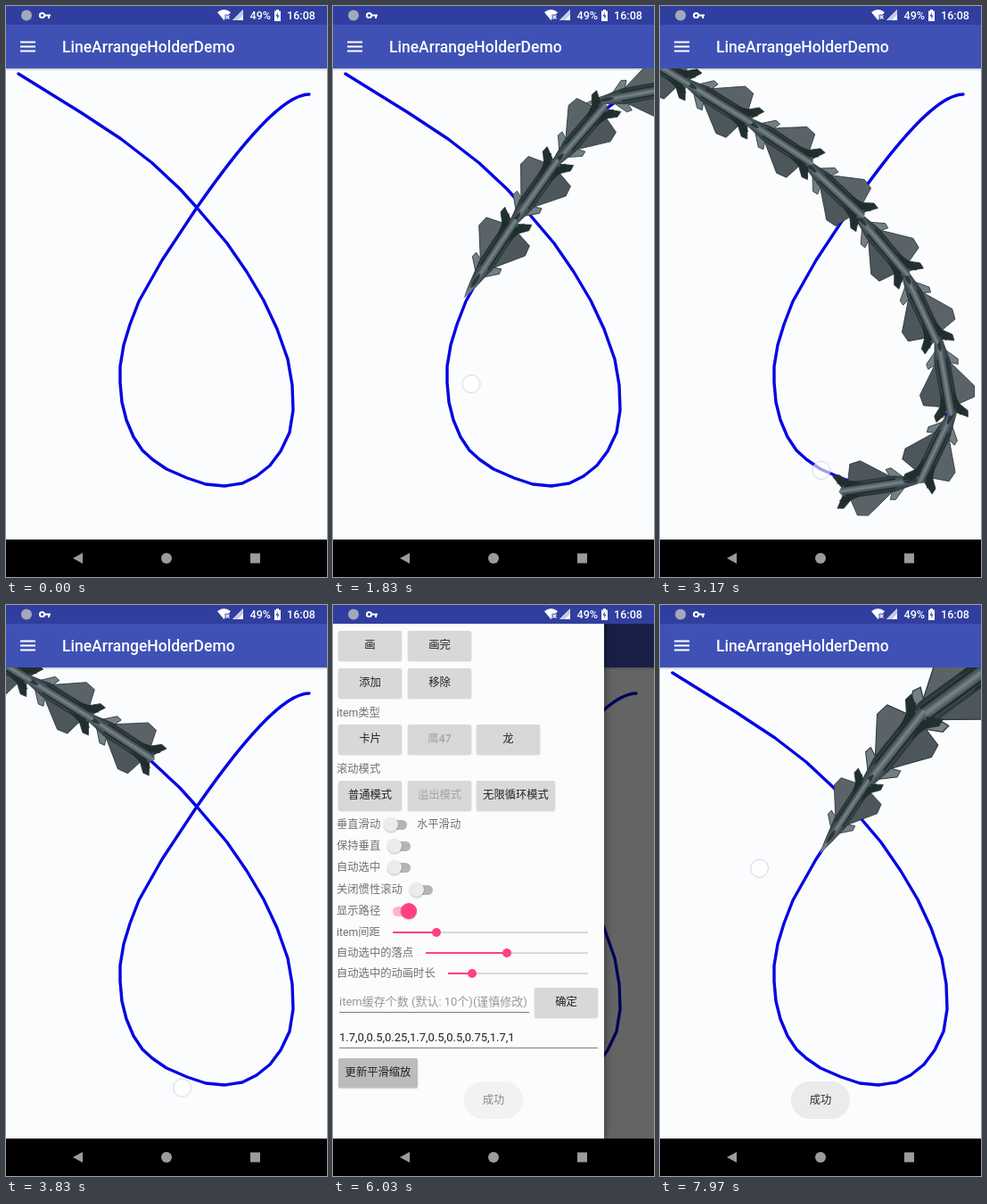
Write an HTML page without scripts that moves like this. It is 360x640 px and loops after 8000 ms.

```html
<!DOCTYPE html>
<html lang="zh-CN">
<head>
<meta charset="utf-8">
<title>Curve scroller</title>
<style>
@property --s { syntax: "<number>"; inherits: true; initial-value: -80; }
@property --g { syntax: "<number>"; inherits: true; initial-value: 0; }

html, body { margin: 0; width: 100%; height: 100%; overflow: hidden; }
body { background: #fbfcfd; }
.stage {
  position: relative; width: 360px; height: 640px; overflow: hidden;
  font: 12.3px Roboto, "Noto Sans CJK SC", "Noto Sans CJK", sans-serif;
}
.stage > svg, .fleet, .page { position: absolute; left: 0; top: 0; width: 360px; height: 640px; }
.fleet { clip-path: inset(70px 0 42px); }
.page { clip-path: inset(21px 0 42px); }

/* --s: distance of the leading jet along the curve, --g: scaling by position */
.fleet { animation: fly 8s linear infinite; }
.jet {
  --d: calc(var(--s) - 82 * var(--i));
  --u: clamp(0, var(--d) / 304.8, 2);
  position: absolute; left: 0; top: 0; width: 120px; height: 80px;
  z-index: calc(10 - var(--i));
  offset-path: path("M520 99H340C310 99 262 157 214 226L175 285 149 331 139 357 132 380 128 404 128 422 130 444 135 464 143 483 153 498 164 508 180 519 203 529 224 536 245 538 265 535 281 527 296 515 308 499 318 478 322 453 321 425 316 396 304 362 289 330 270 298 248 266 214 226 195 205 164 176 129 149 85 120 14 76-154-28");
  offset-distance: calc((var(--d) + 180) * 1px);
  offset-rotate: auto;
  transform: scale(calc(1 + var(--g) * (1.2 * max(1 - var(--u), var(--u) - 1) - .5)));
}
@keyframes fly {
  0%, 12.8% { --s: -80; }
  0%, 58.375% { --g: 0; }
  16.625% { --s: 150; animation-timing-function: ease-out; }
  22.125% { --s: 225; }
  22.875% { --s: 250; }
  25.625% { --s: 445; animation-timing-function: cubic-bezier(.3, .45, .6, .9); }
  32% { --s: 840; }
  32.875% { --s: 910; }
  35.625% { --s: 1100; animation-timing-function: cubic-bezier(.3, .45, .6, .9); }
  39.375% { --s: 1310; }
  42.5% { --s: 1550; animation-timing-function: cubic-bezier(.3, .5, .6, .95); }
  47% { --s: 1807; }
  47.875% { --s: 1828; }
  50%, 52.5% { --s: 1900; }
  58.375% { --s: 2085; }
  58.4%, 87.2% { --s: -130; }
  58.4%, 100% { --g: 1; }
  91.25% { --s: 100; animation-timing-function: ease-out; }
  97.25% { --s: 155; }
  99.625% { --s: 195; }
  100% { --s: 201; }
}

.finger {
  position: absolute; left: -10px; top: -10px; width: 19px; height: 19px;
  border: 1px solid #cfd0de; border-radius: 50%; background: #fff9;
  animation: drag 8s linear infinite, touch 8s step-end infinite;
}
@keyframes drag {
  0%, 12.8% { transform: translate(150px, 560px); }
  16.625%, 17% { transform: translate(158px, 330px); }
  22.125% { transform: translate(153px, 450px); }
  22.875% { transform: translate(154.5px, 424px); }
  25.625%, 26% { transform: translate(158px, 230px); }
  32% { transform: translate(159px, 440px); }
  32.875% { transform: translate(159px, 371px); }
  35.625%, 36% { transform: translate(166px, 180px); }
  39.375% { transform: translate(180px, 540px); }
  42.5%, 43% { transform: translate(185px, 300px); }
  47% { transform: translate(197px, 562px); }
  47.875% { transform: translate(197px, 541px); }
  50%, 52.5% { transform: translate(198px, 470px); }
  58.375% { transform: translate(200px, 290px); }
  87.2% { transform: translate(105px, 560px); }
  91.25%, 91.5% { transform: translate(108px, 330px); }
  97.25% { transform: translate(111px, 335px); }
  99.625% { transform: translate(111px, 295px); }
  100% { transform: translate(111px, 289px); }
}
@keyframes touch {
  0%, 16.7%, 25.7%, 35.7%, 42.6%, 58.4%, 91.3% { opacity: 0; }
  12.85%, 22.1%, 32%, 39.375%, 47%, 87.2%, 97.25% { opacity: 1; }
}

.scrim { position: absolute; inset: 0; background: #000; opacity: 0; animation: dim 8s linear infinite; }
.drawer {
  position: absolute; left: 0; top: 0; width: 304px; height: 598px;
  background: #fcfcfd; box-shadow: 0 0 9px #0008; color: #717171;
  transform: translateX(-320px); animation: slide 8s linear infinite;
}
@keyframes slide {
  0%, 61.6% { transform: translateX(-320px); animation-timing-function: cubic-bezier(.3, .4, .7, .9); }
  64.625% { transform: translateX(-54px); animation-timing-function: ease-out; }
  67.5%, 80.25% { transform: none; animation-timing-function: cubic-bezier(.3, .3, .4, 1); }
  83.75%, 100% { transform: translateX(-320px); }
}
@keyframes dim {
  0%, 61.6% { opacity: 0; }
  64.625% { opacity: .46; animation-timing-function: ease-out; }
  67.5%, 80.25% { opacity: .6; animation-timing-function: cubic-bezier(.3, .3, .4, 1); }
  83.75%, 100% { opacity: 0; }
}

.drawer > * { position: absolute; left: var(--x, 4px); top: var(--y); white-space: nowrap; }
.drawer b {
  width: var(--w, 71px); height: 33px; border-radius: 2px; background: #d7d8d8;
  box-shadow: 0 1px 2px #0003; color: #222;
  font-weight: 500; line-height: 33px; text-align: center;
}
.drawer .off { color: #a3a4a4; }
.drawer .press { animation: press 8s linear infinite; }
@keyframes press {
  0%, 73.2% { background: #d7d8d8; }
  74.3%, 76.5% { background: #bbbdbd; }
  79%, 100% { background: #d7d8d8; }
}
.drawer span { line-height: 16px; margin-top: -8px; }
.drawer .field { left: 7px; font-size: 13px; color: #979797; border-bottom: 1px solid #7d7d7d; width: var(--w); height: 19px; }
.drawer .dark { color: #222; }

.switch { width: 22px; height: 11px; margin-top: -5.5px; border-radius: 6px; background: #b5b5b5; }
.switch::after, .slider::after { content: ""; position: absolute; border-radius: 50%; }
.switch::after { left: -4px; top: -2.5px; width: 16px; height: 16px; background: #ececec; box-shadow: 0 1px 2px #0004; }
.switch.on { background: #ffb3cd; }
.switch.on::after { left: 9px; top: -3.5px; width: 18px; height: 18px; background: #ff4081; }
.slider {
  width: var(--w); height: 2px; margin-top: -1px;
  background: linear-gradient(90deg, #ff4081 var(--v), #d9d9d9 var(--v));
}
.slider::after { left: calc(var(--v) - 5px); top: -4px; width: 10px; height: 10px; background: #ff4081; }

.toast {
  position: absolute; left: 147px; top: 534px; width: 66px; height: 42px;
  border-radius: 21px; background: #ebebeb; color: #2c2c2c;
  line-height: 43px; text-align: center; opacity: 0; animation: toast 8s linear infinite;
}
@keyframes toast {
  0%, 74.3% { opacity: 0; }
  75.375% { opacity: .55; }
  76.5%, 100% { opacity: 1; }
}
</style>
</head>
<body>
<div class="stage">
  <svg viewBox="0 0 360 640">
    <defs>
      <linearGradient id="hull" x2="0" y2="1">
        <stop stop-color="#28343a"/><stop offset=".3" stop-color="#4b585d"/>
        <stop offset=".5" stop-color="#78868a"/><stop offset=".65" stop-color="#48555a"/>
        <stop offset="1" stop-color="#242f34"/>
      </linearGradient>
      <g id="side" stroke="#2b363a" stroke-width=".8">
        <path d="M12-5-24-31-36-29-42-6Z"/>
        <path d="M23-4 9-18 3-17 8-5Z" fill="#738083"/>
        <path d="M-34-5-50-19-57-18-48-3Z" fill="#22302f"/>
      </g>
      <symbol id="jet" viewBox="-60 -40 120 80">
        <use href="#side" fill="#4d575b"/>
        <use href="#side" fill="#5a6468" transform="scale(1 -1)"/>
        <path d="M54 0C42-4 24-6 10-9L-46-9-53 0-46 9 10 9C24 6 42 4 54 0Z" fill="url(#hull)"/>
        <path d="M12-5H-46M12 5H-46" stroke="#202b30" stroke-width="1.6"/>
        <path d="M-24-7-48-13-54-10-44-5ZM-24 7-48 13-54 10-44 5Z" fill="#1f2d2c"/>
        <path d="M40 0C34-3 24-3 20 0 24 3 34 3 40 0Z" fill="#2b373b"/>
      </symbol>
    </defs>
    <rect width="360" height="640" fill="#fbfcfd"/>
    <path fill="none" stroke="#0505e2" stroke-width="3.4" stroke-linecap="round" stroke-linejoin="round" d="M340 99C310 99 262 157 214 226L175 285 149 331 139 357 132 380 128 404V422L130 444 135 464 143 483 153 498 164 508 180 519 203 529 224 536 245 538 265 535 281 527 296 515 308 499 318 478 322 453 321 425 316 396 304 362 289 330 270 298 248 266 214 226 195 205 164 176 129 149 85 120 14 76"/>
    <rect y="70" width="360" height="2" fill="#0002"/>
    <rect y="21" width="360" height="49" fill="#3f51b5"/>
    <path d="M16 40.5H33M16 45.5H33M16 50.5H33" stroke="#fff" stroke-width="1.8"/>
    <text x="63" y="52" font-size="17.5" font-weight="500" fill="#fff">LineArrangeHolderDemo</text>
  </svg>

  <div class="fleet">
    <svg class="jet" style="--i:0"><use href="#jet"/></svg>
    <svg class="jet" style="--i:1"><use href="#jet"/></svg>
    <svg class="jet" style="--i:2"><use href="#jet"/></svg>
    <svg class="jet" style="--i:3"><use href="#jet"/></svg>
    <svg class="jet" style="--i:4"><use href="#jet"/></svg>
    <svg class="jet" style="--i:5"><use href="#jet"/></svg>
    <svg class="jet" style="--i:6"><use href="#jet"/></svg>
    <svg class="jet" style="--i:7"><use href="#jet"/></svg>
    <svg class="jet" style="--i:8"><use href="#jet"/></svg>
    <svg class="jet" style="--i:9"><use href="#jet"/></svg>
  </div>
  <div class="finger"></div>

  <div class="page">
    <div class="scrim"></div>
    <div class="drawer">
      <b style="--x:6px;--y:29px">画</b>
      <b style="--x:84px;--y:29px">画完</b>
      <b style="--x:6px;--y:71px">添加</b>
      <b style="--x:84px;--y:71px">移除</b>
      <span style="--y:121px">item类型</span>
      <b style="--x:6px;--y:134px">卡片</b>
      <b class="off" style="--x:84px;--y:134px">鹰47</b>
      <b style="--x:161px;--y:134px">龙</b>
      <span style="--y:184px">滚动模式</span>
      <b style="--x:6px;--y:197px">普通模式</b>
      <b class="off" style="--x:84px;--y:197px">溢出模式</b>
      <b style="--x:161px;--y:197px;--w:88px">无限循环模式</b>

      <span style="--y:246px">垂直滑动</span>
      <i class="switch" style="--x:61px;--y:246px"></i>
      <span style="--x:94px;--y:246px">水平滑动</span>
      <span style="--y:270px">保持垂直</span>
      <i class="switch" style="--x:65px;--y:270px"></i>
      <span style="--y:294px">自动选中</span>
      <i class="switch" style="--x:65px;--y:294px"></i>
      <span style="--y:319px">关闭惯性滚动</span>
      <i class="switch" style="--x:90px;--y:319px"></i>
      <span style="--y:343px">显示路径</span>
      <i class="switch on" style="--x:67px;--y:343px"></i>

      <span style="--y:367px">item间距</span>
      <i class="slider" style="--x:67px;--y:366.5px;--w:219px;--v:49px"></i>
      <span style="--y:390px">自动选中的落点</span>
      <i class="slider" style="--x:104px;--y:389.5px;--w:182px;--v:91px"></i>
      <span style="--y:413px">自动选中的动画时长</span>
      <i class="slider" style="--x:129px;--y:412.5px;--w:157px;--v:27px"></i>

      <span class="field" style="--y:445px;--w:213px">item缓存个数 (默认: 10个)(谨慎修改)</span>
      <b style="--x:226px;--y:429px">确定</b>
      <span class="field dark" style="--y:485px;--w:290px">1.7,0,0.5,0.25,1.7,0.5,0.5,0.75,1.7,1</span>
      <b class="press" style="--x:6px;--y:508px;--w:89px">更新平滑缩放</b>
    </div>
  </div>
  <div class="toast">成功</div>

  <svg viewBox="0 0 360 640">
    <rect width="360" height="21" fill="#303f9f"/>
    <circle cx="23" cy="10.5" r="6" fill="#a4a8bc"/>
    <g fill="none" stroke="#fff" stroke-width="2"><circle cx="40.5" cy="10.5" r="2.6"/><path d="M43 10.5H50M48 10.5V14"/></g>
    <path d="M237 7Q244.5 1 252 7L244.5 16ZM254 16 266 4V16Z" fill="#fff"/>
    <path d="M254 16 266 4V10L260 16Z" fill="#c9cce2"/>
    <path d="M246 10 251 15M251 10 246 15" stroke="#303f9f" stroke-width="3"/>
    <path d="M246.5 10.5 250.5 14.5M250.5 10.5 246.5 14.5" stroke="#fff" stroke-width="1.2"/>
    <path d="M301 5.5H303V4H306V5.5H308V17H301Z" fill="#fff"/>
    <path d="M305 7 302.5 11.5H304.5L304 15 306.5 10.5H304.5Z" fill="#303f9f"/>
    <g font-size="12.6" font-weight="500" fill="#fff"><text x="273.5" y="15">49%</text><text x="315" y="15">16:08</text></g>
    <rect y="598" width="360" height="42"/>
    <g fill="#9b9b9b"><path d="M75 619 86 613V625Z"/><circle cx="180" cy="619" r="6"/><rect x="274" y="613.5" width="11" height="11"/></g>
  </svg>
</div>
</body>
</html>
```
